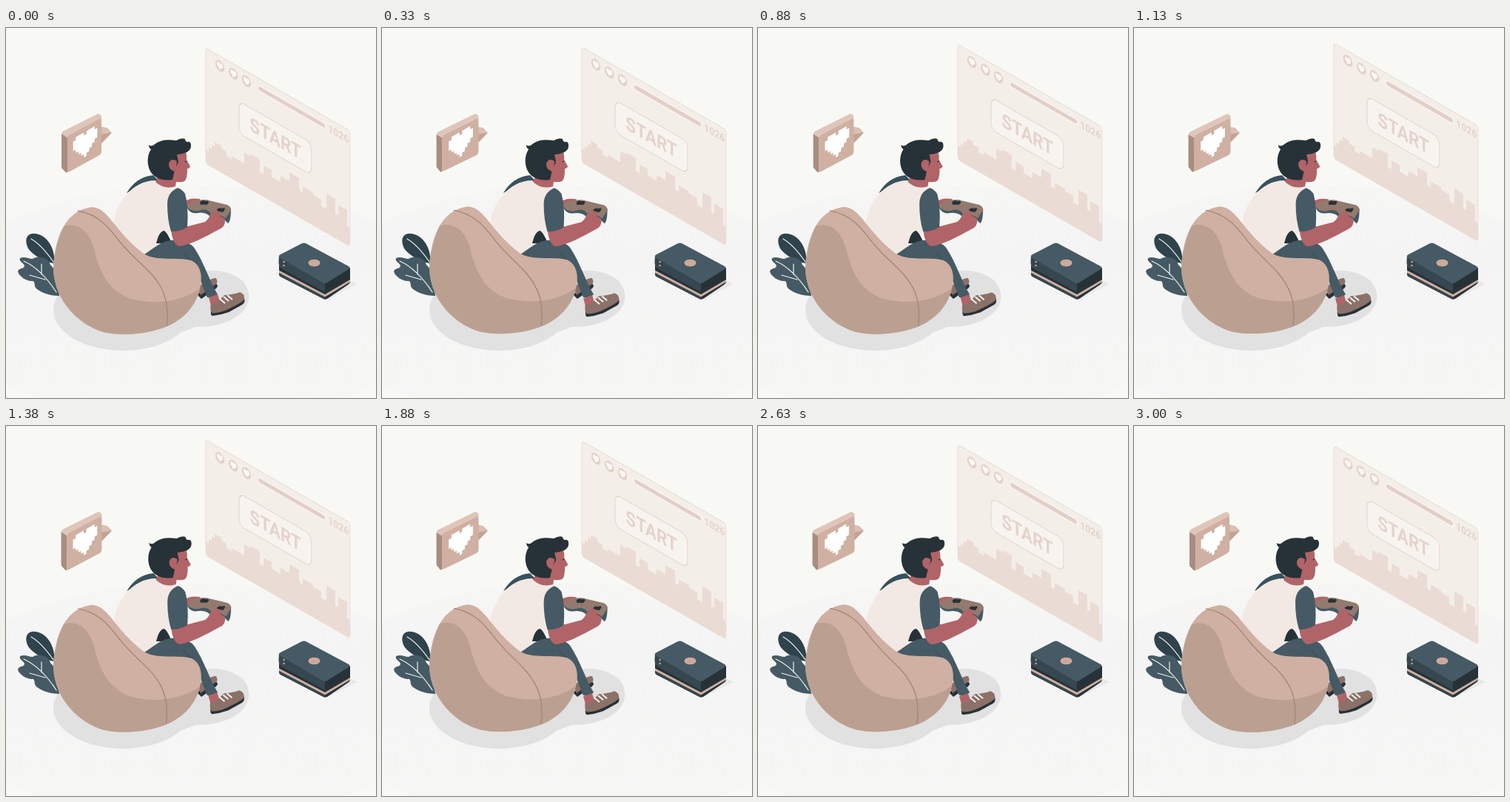
These frames come from a looping animation (500 by 500 pixels, 3040 ms). An HTML page:

```html
<!DOCTYPE html>
<html lang="en">
<head>
<meta charset="utf-8">
<title>Game night</title>
<style>
html, body { margin: 0; width: 100%; height: 100%; overflow: hidden; background: #f8f9f4; }
svg { display: block; width: 100vw; height: 100vh; }
text { font-family: Roboto, Arial, sans-serif; font-weight: 700; fill: #e5d3cb; text-anchor: middle; }
.dark { fill: #263238; }
.slate { fill: #455a64; }
.skin { fill: #b16468; }
.brown { fill: #8b7167; }
.vein { fill: none; stroke: #edf0ef; stroke-width: 1.2; stroke-linecap: round; }
</style>
</head>
<body>
<svg viewBox="0 0 500 500">
  <defs>
    <linearGradient id="floorFill" x2="0" y2="1">
      <stop offset="0" stop-color="#f6f6f5"/>
      <stop offset=".3" stop-color="#f4f4f4"/>
      <stop offset="1" stop-color="#f6f7f5"/>
    </linearGradient>
  </defs>
  <ellipse cx="250" cy="372" rx="340" ry="160" fill="url(#floorFill)"/>
  <g fill="#e1e1e1">
    <ellipse cx="158" cy="381" rx="94" ry="55"/>
    <path d="M225 345C246 326 290 321 315 338C333 350 333 376 313 389C298 400 278 404 256 404L225 416Z"/>
    <path d="M364 331L432 368L474 346L458 337Z" fill="#e7e8e8"/>
  </g>

  <g id="screen">
    <g transform="matrix(.866 .498 0 1 270 27)">
      <rect width="225" height="156" rx="4" fill="#f4eee9" stroke="#e8d9d1"/>
      <path id="skyline" fill="#eadcd4"/>
      <g id="lives"></g>
      <rect x="80" y="8.500" width="108" height="9" rx="4.500" fill="#f8f4f0"/>
      <rect x="82" y="10.200" width="104" height="5.600" rx="2.800" fill="#e2cfc6"/>
      <text x="207" y="18" font-size="14">1026</text>
      <rect x="52" y="46" width="113" height="43.500" rx="9" fill="#f7f4f0" stroke="#e3d0c7"/>
      <text x="108.500" y="77" font-size="26">START</text>
    </g>
  </g>

  <g id="console">
    <path class="dark" d="M369 318L431 350L465 330V343Q465 345 462 347L434 366Q431 367 428 365.500L371 336Q369 335 369 332Z"/>
    <path d="M369 327.500L431 360L465 340V343L431 363.500L369 331Z" fill="#cfb0a2"/>
    <path d="M369 331L431 363.500V367L371 336Q369 335 369 331Z" fill="#37474f"/>
    <path d="M369 307L431 344V357L372 325Q368 322 368.500 315Z" fill="#37474f"/>
    <path class="dark" d="M431 344L465 324V335Q465 337 462 339L434 355Q432 356 431 356Z"/>
    <path class="slate" d="M371 306L400 291Q403 290 406 291.500L463 322Q466 324 463 326L434 344Q431 346 428 344L371 311Q367 308 371 306Z"/>
    <ellipse cx="416.500" cy="317.500" rx="8" ry="4.800" fill="#cfa99a"/>
    <circle cx="375.500" cy="316" r="1.200" fill="#cfa99a"/>
    <circle cx="375.500" cy="321" r="1.200" fill="#cfa99a"/>
  </g>

  <g id="bubble">
    <path d="M127 135L143 141.500L128 157Z" fill="#c4a294"/>
    <path d="M127 133L137 135L143 141.500L127 144Z" fill="#dabfb3"/>
    <path id="bubbleSide" fill="#a98c80"/>
    <path id="bubbleTop" fill="#dfc5ba"/>
    <path id="bubbleFront" fill="#cfb0a2"/>
    <path id="pixelHeart" fill="#fff"/>
  </g>

  <g id="leaves">
    <path d="M66 318C57 318 38 309 30 298C25 288 27 279 35 278C50 276 63 291 65 308Z" fill="#2f434d"/>
    <path class="slate" d="M72 362C62 362 50 359 42 353C37 349 40 345 37 342C28 343 17 335 16 329C17 324 25 326 25 321C23 317 17 315 19 311C25 308 31 312 36 312C45 307 57 310 60 320L69 330Z"/>
    <path class="vein" d="M34 285Q48 293 64 316M24 315Q48 326 68 357M48 333L48 319M53 340L32 334"/>
  </g>

  <g id="torso">
    <path d="M163 223Q176 201 199 199L207 207L180 214Z" fill="#37525c"/>
    <path d="M202 206C186 206 172 214 163 225C151 239 145 254 146 268L177 310L190 307C203 300 214 292 222 274L231 217Q213 217 202 206Z" fill="#f2e9e5"/>
  </g>

  <g id="legs">
    <path class="dark" d="M258 360L283 344L286 348Q286 351 281 354L264 366Z"/>
    <path class="brown" d="M258 349C269 346 277 337 284 338Q287 344 284 346L263 361Z"/>
    <path class="dark" d="M203 291Q207 274 214 274Q219 278 224 291Z"/>
    <path class="slate" d="M183 308C197 301 206 289 222 287C238 286 249 290 255 298C268 318 275 342 286 360Q281 365 272 364C266 350 262 340 260 330L222 340Z"/>
    <path d="M239 303Q251 313 261 333" fill="none" stroke="#37474f"/>
    <g id="foot">
      <path class="skin" d="M274 364L286 360L289 370L277 375Z"/>
      <path class="dark" d="M277 381L322 365Q324 371 319 374L301 384Q290 388 279 389Q276 388 277 381Z"/>
      <path class="brown" d="M277 372Q283 374 287 369L295 361Q308 360 316 357Q323 359 322 367Q319 371 300 380Q288 386 278 385Q275 379 277 372Z"/>
      <path d="M289 366L296 372M294 363L301 369M299 361L306 367" stroke="#f5f2ef" stroke-width="2"/>
    </g>
  </g>

  <g id="arms">
    <path class="skin" d="M241 235Q247 229 262 231L263 239L246 243Z"/>
    <path class="slate" d="M244 241L272 239L304 244Q304 261 300 264L292 256L277 256Q270 248 259 250Q248 252 244 241Z"/>
    <path d="M244 240Q251 231 270 232L299 239Q304 241 304 246L297 257Q284 249 278 252Q272 242 260 247Q248 248 244 240Z" fill="#947a6e"/>
    <g class="dark">
      <path d="M262 235l4 -2l3 1l4 -.5l1 2.500l-3 3l-4 -.5l-4 .5z"/>
      <path d="M285 245l4 -2l2 1l4 -1l1 2l-3 4l-4 -1l-4 1z"/>
    </g>
    <path class="skin" d="M223 272L246 268L269 262Q274 258 276 252Q284 244 288 248Q291 250 289 254L296 258Q297 269 288 272C268 283 249 293 234 295Q225 292 223 272Z"/>
    <path class="slate" d="M232 216Q218 222 218 238Q218 259 223 275Q236 275 245 269Q247 242 242 224Q238 218 232 216Z"/>
  </g>

  <g id="head">
    <path class="skin" d="M205 199Q204 205 202 208Q214 219 229 214L231 201Z"/>
    <path class="skin" d="M222 169L241 163Q245 171 244 178L249 187Q248 190 245 190Q245 205 241 207Q234 210 222 206Z"/>
    <path class="dark" d="M196 164Q193 162 192.500 158Q197 161 201 157C210 150 221 151 230 152Q237 148 242 150Q242 153 245 154Q250 153 250 159Q250 165 244 168Q237 171 231 171L233 181L228 191L225 205Q211 207 202 201C190 193 189 174 196 164Z"/>
    <path class="skin" d="M231 180Q223 175 220 183Q219 192 229 194Z"/>
    <path d="M241.500 181L244 180" stroke="#263238" stroke-width="1.200"/>
  </g>

  <g id="bean">
    <path d="M64 327C65 292 76 246 117 242C139 244 145 273 186 305C203 316 234 309 250 314C264 320 266 337 262 352C257 376 239 394 218 403C194 413 160 417 132 411C100 402 66 370 64 327Z" fill="#cfb0a2"/>
    <path d="M64 327C65 308 69 286 78 268C96 262 112 273 119 298C127 333 140 356 169 366C200 374 236 371 262 352C257 376 239 394 218 403C194 413 160 417 132 411C100 402 66 370 64 327Z" fill="#bba092"/>
    <path id="seam" fill="none" stroke="#a58577" stroke-width="1.300"/>
  </g>
</svg>
<script>
const LOOP = 3040;
const el = id => document.getElementById(id);
const set = (id, name, value) => el(id).setAttribute(name, value);
const move = (id, x, y) => set(id, "transform", `translate(${x.toFixed(2)} ${y.toFixed(2)})`);

// Roofs as [left edge in px, depth below the screen top]
const roofs = [[0, 137], [4, 132], [8, 126], [12, 120], [21, 124], [28, 130], [35, 126], [52, 111],
  [61, 108], [73, 126], [78, 114], [89, 123], [101, 115], [113, 103], [126, 120], [131, 112],
  [145, 115], [156, 124], [163, 103], [175, 123], [179, 109], [191, 131]];
set("skyline", "d", "M0 153" + roofs.map(([x, y]) => `H${(x / .866).toFixed(1)}V${y}`).join("") + "H225V153Q225 156 222 156H3Q0 156 0 153Z");

el("lives").innerHTML = [22, 43, 63.5].map(x => `<g transform="translate(${x} 13.300)">
  <circle r="7.200" fill="#e3d1c9"/>
  <path d="M0 5L-4.600 .5Q-5.500 -4.500 -2 -4.500Q0 -4.500 0 -2.500Q0 -4.500 2 -4.500Q5.500 -4.500 4.600 .5Z" fill="#faf6f3"/></g>`).join("");

// Heart rows as runs of [first cell, length]
const heartRows = [[[1, 3], [5, 3]], [[0, 9]], [[0, 9]], [[0, 9]], [[1, 7]], [[2, 5]], [[3, 3]], [[4, 1]]];
const cell = 4.2;
set("pixelHeart", "d", heartRows.map((runs, row) => runs.map(([start, n]) =>
  `M${(start - 4.5) * cell} ${(row - 4) * cell}h${n * cell}v${cell + .1}h${-n * cell}z`).join("")).join(""));

function drawBubble(b) {
  const left = 75 - 1.5 * b, front = 83 - 2 * b, right = 129 + 1.5 * b;
  const top = 141 + b, corner = 146.5, bottom = 195 - b;
  set("bubbleSide", "d", `M${left} ${top + 2}L${front} ${corner}V${bottom}Q${front - 2} 196 ${left + 2} ${bottom - 4}Q${left} ${bottom - 5} ${left} ${bottom - 8}Z`);
  set("bubbleTop", "d", `M${left} ${top + 2}Q${left} ${top} ${left + 3} ${top - 2}L${right - 6} 116.500Q${right - 3} 115 ${right} 119V124L${front} ${corner + 2}Z`);
  set("bubbleFront", "d", `M${front} ${corner + 2}Q${front} ${corner} ${front + 3} ${corner - 2}L${right - 3} 123Q${right} 122 ${right} 125V167Q${right} 170 ${right - 3} 172L${front + 3} ${bottom - 1}Q${front} ${bottom + 1} ${front} ${bottom - 2}Z`);
  set("pixelHeart", "transform", `translate(${107 - .5 * b} ${157 - .3 * b}) matrix(.866 -.5 0 1 0 0)`);
}

function render(t) {
  const phase = t / LOOP;
  const ramp = 1 - Math.abs(1 - 2 * phase);
  const wave = (1 - Math.cos(2 * Math.PI * phase)) / 2;
  const bounce = Math.sin(4 * Math.PI * phase) ** 2;

  move("screen", 0, -8.8 * (.65 * ramp + .35 * wave));
  move("head", 2.2 * bounce, 0);
  move("torso", bounce, 0);
  move("arms", .6 * bounce, .3 * bounce);
  move("foot", -2 * bounce, 1.2 * bounce);
  move("bean", 0, -.7 * bounce);
  set("seam", "d", `M97 247C126 252 139 270 154 289C172 312 ${196 - bounce} 327 ${208 - 2 * bounce} 348Q${221 - 2 * bounce} 369 ${217 - 2 * bounce} 403`);
  drawBubble(bounce);
}

const start = performance.now();
function tick(now) {
  render(Math.max(0, now - start) % LOOP);
  requestAnimationFrame(tick);
}
render(0);
requestAnimationFrame(tick);
</script>
</body>
</html>
```
